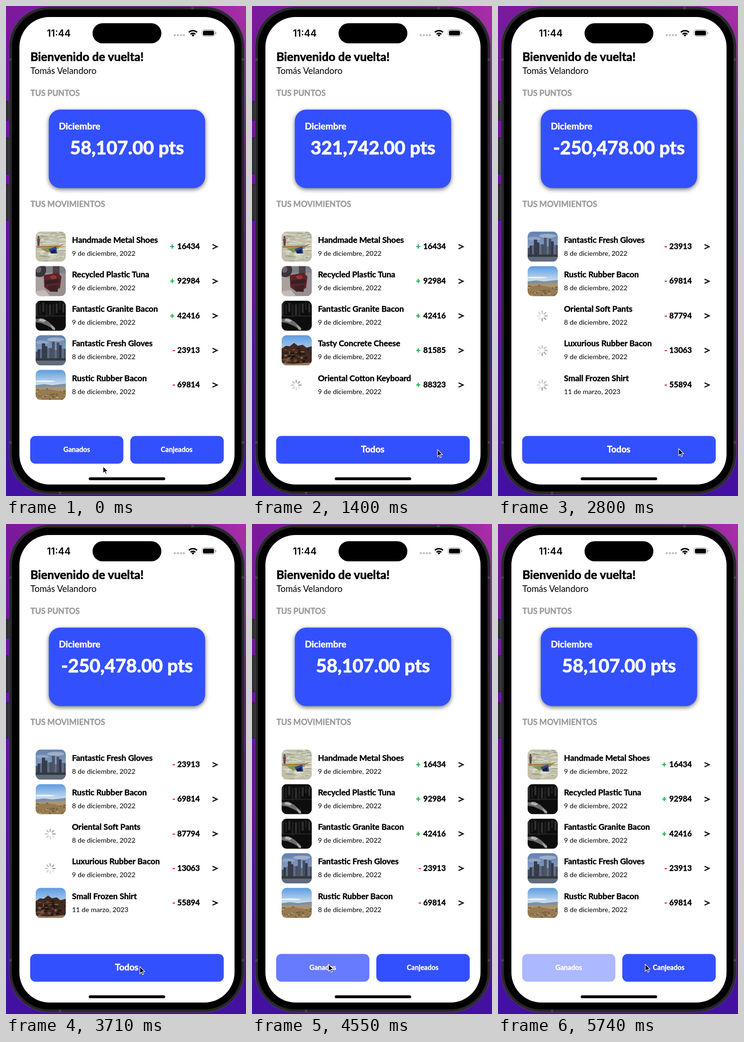
Animation of 502x1024 px, one loop 5.81 s. Source, as an HTML page:

```html
<!DOCTYPE html>
<html lang="es">
<head>
<meta charset="utf-8">
<title>Puntos</title>
<style>
  html, body { margin: 0; width: 100%; height: 100%; overflow: hidden; background: #4a109c; }
  svg { display: block; }
  text {
    font-family: Lato, "Open Sans", sans-serif; font-weight: 700; white-space: pre;
    fill: currentColor; stroke: currentColor; stroke-width: .027em;
  }
  .light { font-weight: 400; stroke: none; }
  .clock { font-family: Inter, sans-serif; font-weight: 600; stroke: none; }
  .label { font-size: 16.7px; color: #9b9b9b; }
  .white { color: #fff; }
  .mid { text-anchor: middle; color: #fff; }
  .card { filter: drop-shadow(0 3px 4px rgba(0,0,0,.5)) drop-shadow(0 1px 7px rgba(0,0,0,.06)); }
</style>
</head>
<body>
<svg width="502" height="1024" viewBox="0 0 502 1024">
  <defs>
    <linearGradient id="wall" x2="0" y2="1">
      <stop stop-color="#7b1a9b"/><stop offset=".35" stop-color="#6a12a4"/><stop offset="1" stop-color="#4210a2"/>
    </linearGradient>
    <radialGradient id="glow" cx="1" cy="0" r=".35">
      <stop stop-color="#a92fa8"/><stop offset="1" stop-color="#a92fa8" stop-opacity="0"/>
    </radialGradient>
    <linearGradient id="city" x2="0" y2="1"><stop stop-color="#6280b0"/><stop offset="1" stop-color="#aab7cc"/></linearGradient>
    <linearGradient id="sky" x2="0" y2="1"><stop stop-color="#5c9bdf"/><stop offset="1" stop-color="#dbe8f2"/></linearGradient>
    <clipPath id="thumb"><rect width="63" height="63" rx="11"/></clipPath>
  </defs>

  <rect width="502" height="1024" fill="url(#wall)"/>
  <rect width="502" height="1024" fill="url(#glow)"/>
  <g fill="#302f34" stroke="#17161a">
    <rect x="-3" y="199.500" width="11" height="39" rx="2"/>
    <rect x="-3" y="275.500" width="11" height="75" rx="2"/>
    <rect x="-3" y="373.500" width="11" height="74" rx="2"/>
  </g>
  <rect x="6.500" y="1.500" width="492" height="1019" rx="84" fill="#29282c" stroke="#4c4b50"/>
  <path d="M390 2v7M113 1014v7M7 112h6M492 112h6M7 912h6M492 912h6" stroke="#555459" stroke-width="5" opacity=".6"/>
  <rect x="12.500" y="7.500" width="480" height="1007" rx="78" fill="#000" stroke="#111"/>
  <rect x="28" y="23" width="450" height="977" rx="63" fill="#fff"/>

  <rect x="181" y="36" width="144" height="42" rx="21"/>
  <text x="85.500" y="63.500" font-size="20" class="clock">11:44</text>
  <path d="M353 61h.01M359.500 61h.01M366 61h.01M372 61h.01" stroke="#bcbcbc" stroke-width="4.600" stroke-linecap="round"/>
  <g fill="none" stroke="#000" stroke-width="3">
    <path d="M382.500 55a12.300 12.300 0 0 1 17 0M386 59a7.200 7.200 0 0 1 10 0"/>
  </g>
  <path d="M391 64l-3-3.200a4.200 4.200 0 0 1 6 0z"/>
  <rect x="410" y="49.500" width="27" height="14" rx="4.500" fill="none" stroke="#999"/>
  <rect x="412" y="51.500" width="23" height="10" rx="2.800"/>
  <path d="M438.500 54.500q2 2 0 4z" fill="#999" stroke="#999"/>

  <text x="51" y="115" font-size="24.700">Bienvenido de vuelta!</text>
  <text x="51" y="141.500" font-size="18.500" class="light">Tomás Velandoro</text>
  <text x="51" y="187.500" class="label">TUS PUNTOS</text>
  <rect class="card" x="89.500" y="216.500" width="327" height="164" rx="24" fill="#3350ff"/>
  <text x="110.500" y="258" font-size="19" class="white">Diciembre</text>
  <text id="points" class="mid" x="253" y="310" font-size="38.800"></text>
  <text x="51" y="419.500" class="label">TUS MOVIMIENTOS</text>
  <g id="rows"></g>
  <g id="first">
    <rect x="50.500" y="898.500" width="195" height="58" rx="11" fill="#3350ff"/>
    <text class="mid"></text>
  </g>
  <g id="second">
    <rect x="260" y="898.500" width="195.500" height="58" rx="11" fill="#3350ff"/>
    <text class="mid" x="357" y="932" font-size="14.400">Canjeados</text>
  </g>
  <rect x="173" y="985" width="160" height="6" rx="3"/>
  <path id="cursor" d="M0 0V14.500L3.400 11.400L5.700 16.500L8 15.500L5.700 10.500H10.300Z" stroke="#fff" stroke-width="1.100"/>
</svg>

<script>
const LOOP = 5810, FRAME = 70;
const $ = id => document.getElementById(id);
const range = n => [...Array(n).keys()];

// Small illustrations, 63 x 63
const rect = (x, y, w, h, fill) => `<rect x="${x}" y="${y}" width="${w}" height="${h}" fill="${fill}"/>`;
const path = (d, fill) => `<path d="${d}" fill="${fill}"/>`;
const oval = (x, y, rx, ry, fill) => `<ellipse cx="${x}" cy="${y}" rx="${rx}" ry="${ry}" fill="${fill}"/>`;

function scatter(n, seed, draw) {
  const rnd = () => (seed = seed * 16807 % 2147483647) / 2147483647;
  return range(n).map(i => draw(rnd, i)).join('');
}

const art = {
  boat: rect(0, 0, 63, 63, '#c0bfa9') +
    scatter(70, 71, r => rect(r() * 60 - 6, r() * 62, 5 + r() * 13, 1.3, r() < .65 ? '#e6e6da' : '#9b9b80')) +
    path('M0 31L50 29L62 25L50 32L4 34Z', '#a5773c') + path('M10 35L50 31L48 35L24 44Z', '#8a9250') +
    path('M27 37L43 31L45 46L32 46Z', '#2a4792') + path('M31 41L41 37L42 45L33 46Z', '#17213c') +
    oval(6, 12, 2, 2.5, '#54424a') + path('M3 15H9L8 30H4Z', '#6a4248'),
  engine: rect(0, 0, 63, 63, '#988f91') + rect(20, 0, 43, 14, '#7d8088') +
    path('M0 22L20 26L18 63H0Z', '#aaa19f') +
    oval(8, 8, 14, 15, '#39343a') + oval(6, 7, 6, 7, '#6a6268') + rect(36, 0, 14, 18, '#4d4247') +
    path('M17 19L46 14L54 22L51 46L32 54L18 44Z', '#5e2428') +
    path('M19 30L49 27L50 35L20 38Z', '#33202a') + path('M25 42L47 39L46 54L30 53Z', '#3b2228') +
    oval(37, 23, 7, 4, '#9a3532') + path('M0 53L20 50L30 63H0Z', '#c4bbb7'),
  dark: rect(0, 0, 63, 63, '#0d0d0d') +
    scatter(9, 38, (r, i) => rect(i * 7, 3 + r() * 6, 4, 14 + r() * 16, i % 2 ? '#1e1e1e' : '#303030')) +
    rect(0, 31, 63, 2, '#262626') + path('M0 38L15 37L27 44L40 56L38 60L24 52L12 47L0 45Z', '#6c6c6c') +
    path('M9 37L22 41L17 45L6 42Z', '#b4b4b4') + path('M30 49L41 58L40 62L35 60Z', '#a4a4a4'),
  skyline: rect(0, 0, 63, 63, 'url(#city)') + oval(42, 9, 18, 4, '#9fafc8') + oval(14, 15, 14, 4, '#8fa4c6') +
    scatter(13, 93, (r, i) => {
      const h = 20 + r() * 20;
      return rect(i * 5 - 1, 54 - h, 5.5, h, ['#475064', '#333a49', '#616b80'][i % 3]);
    }) + rect(13, 17, 7, 36, '#363d4d') + rect(34, 13, 6, 40, '#4a5569') +
    rect(0, 48, 63, 5, '#343a39') + rect(0, 53, 63, 10, '#606b7c'),
  desert: rect(0, 0, 63, 36, 'url(#sky)') + oval(18, 24, 23, 2, '#e9f0f6') +
    path('M0 32L18 30L34 32L63 29V40H0Z', '#7c8fa4') + path('M0 37L63 35V63H0Z', '#aa9473') +
    path('M0 43L24 40L63 47V63H0Z', '#967a52') +
    scatter(30, 17, r => oval(r() * 63, 40 + r() * 22, 1 + r() * 3, 1 + r(), r() < .6 ? '#75623f' : '#bd9f6f')),
  rocks: rect(0, 0, 63, 46, 'url(#sky)') + path('M0 28L9 22L17 23L26 16L34 22L44 20L52 26L63 23V63H0Z', '#412a20') +
    scatter(56, 29, r => oval(r() * 63, 27 + r() * 30, 1 + r() * 4, 1 + r() * 2,
      ['#21150f', '#6b4733', '#34211a', '#86604a'][r() * 4 | 0])) +
    path('M0 58L24 60L63 57V63H0Z', '#9a7c60')
};

// Movements: title, date, amount, picture
const DAY8 = '8 de diciembre, 2022', DAY9 = '9 de diciembre, 2022';
const shoes = ['Handmade Metal Shoes', DAY9, 16434, 'boat'];
const tuna = ['Recycled Plastic Tuna', DAY9, 92984, 'engine'];
const darkTuna = [...tuna.slice(0, 3), 'dark'];
const granite = ['Fantastic Granite Bacon', DAY9, 42416, 'dark'];
const gloves = ['Fantastic Fresh Gloves', DAY8, -23913, 'skyline'];
const rubber = ['Rustic Rubber Bacon', DAY8, -69814, 'desert'];
const cheese = ['Tasty Concrete Cheese', DAY9, 81585, 'rocks'];
const keyboard = ['Oriental Cotton Keyboard', DAY9, 88323, 'rocks'];
const pants = ['Oriental Soft Pants', DAY8, -87794];
const luxury = ['Luxurious Rubber Bacon', DAY9, -13063];
const shirt = ['Small Frozen Shirt', '11 de marzo, 2023', -55894, 'rocks'];

const ALL = '58,107.00 pts', EARNED = '321,742.00 pts', SPENT = '-250,478.00 pts';
const before = [shoes, tuna, granite, gloves, rubber];
const after = [shoes, darkTuna, granite, gloves, rubber];
// Start, total, movements, time each picture arrives by row
const scenes = [
  [0, ALL, before, {}],
  [549, EARNED, [shoes, tuna, granite, cheese, keyboard], { 3: 1050, 4: 1880 }],
  [2222, ALL, before, {}],
  [2790, SPENT, [gloves, rubber, pants, luxury, shirt], { 2: LOOP, 3: LOOP, 4: 3060 }],
  [4399, ALL, after, {}],
  [4890, EARNED, [shoes, darkTuna, granite, cheese, keyboard], { 3: 5400, 4: LOOP }],
  [5652, ALL, after, {}]
];
// Button, down, up
const presses = [
  [0, 430, 549], [0, 2100, 2222], [1, 2660, 2790],
  [0, 4340, 4399], [0, 4760, 4890], [0, 5560, 5652]
];
const route = [
  [0, 203, 962], [400, 159, 925], [840, 159, 925], [1400, 388, 927], [1890, 378, 925],
  [3290, 378, 925], [3710, 280, 925], [3850, 272, 925], [3920, 272, 925],
  [4200, 160, 920], [4900, 160, 920], [5500, 308, 920], [LOOP, 308, 920]
];

function spinner(step) {
  return range(8).map(i => {
    const grey = 158 + 10 * ((step - i + 800) % 8);
    return `<path d="M0 -5.500V-10.200" transform="translate(30.500 32) rotate(${i * 45})"
      stroke="rgb(${grey},${grey},${grey})" stroke-width="2.600" stroke-linecap="round"/>`;
  }).join('');
}

function row([title, date, amount, picture], i, loaded, step) {
  const sign = amount > 0 ? ['+', 343, '#12b04a'] : ['-', 348, '#d3222f'];
  return `<g transform="translate(0 ${471 + i * 72.25})">
    <g transform="translate(62 .3)" ${loaded ? 'clip-path="url(#thumb)"' : ''}>${loaded ? art[picture] : spinner(step)}</g>
    <text x="138" y="23.500" font-size="17">${title}</text>
    <text x="138" y="50.500" font-size="14.300" class="light">${date}</text>
    <text x="${sign[1]}" y="37" font-size="16.300" color="${sign[2]}">${sign[0]}</text>
    <text x="405.500" y="37" font-size="16.300" text-anchor="end">${Math.abs(amount)}</text>
    <path d="M432 27.500L441.500 32L432 36.500" fill="none" stroke="#000" stroke-width="2.400"/>
  </g>`;
}

function opacity(button, t) {
  const press = presses.filter(p => p[0] === button && t >= p[1]).pop();
  if (!press) return 1;
  const x = Math.min(1, Math.max(0, (t - press[2]) / 250));
  return .2 + .8 * (x < .5 ? 2 * x * x : 1 - 2 * (1 - x) ** 2);
}

function pointer(t) {
  const k = route.findIndex(p => p[0] > t);
  const [a, b] = [route[k - 1], route[k]];
  const u = (t - a[0]) / (b[0] - a[0]), e = u * u * (3 - 2 * u);
  return [1, 2].map(c => a[c] + (b[c] - a[c]) * e);
}

let shown;
function draw(now) {
  const t = Math.floor(now % LOOP / FRAME) * FRAME;
  if (t !== shown) {
    shown = t;
    const [, total, list, arrivals] = scenes.filter(s => t >= s[0]).pop();
    const wide = total !== ALL;
    $('points').textContent = total;
    $('rows').innerHTML = list.map((item, i) => row(item, i, t >= (arrivals[i] || 0), Math.floor(t / 140))).join('');

    const [box, label] = $('first').children;
    box.setAttribute('width', wide ? 405 : 195);
    label.textContent = wide ? 'Todos' : 'Ganados';
    label.setAttribute('x', wide ? 252.5 : 148);
    label.setAttribute('y', wide ? 933 : 932);
    label.setAttribute('font-size', wide ? 18.6 : 14.4);
    $('first').setAttribute('opacity', opacity(0, t));
    $('second').setAttribute('opacity', wide ? 0 : opacity(1, t));
    $('cursor').setAttribute('transform', `translate(${pointer(t)})`);
  }
  requestAnimationFrame(draw);
}
draw(0);
</script>
</body>
</html>
```
